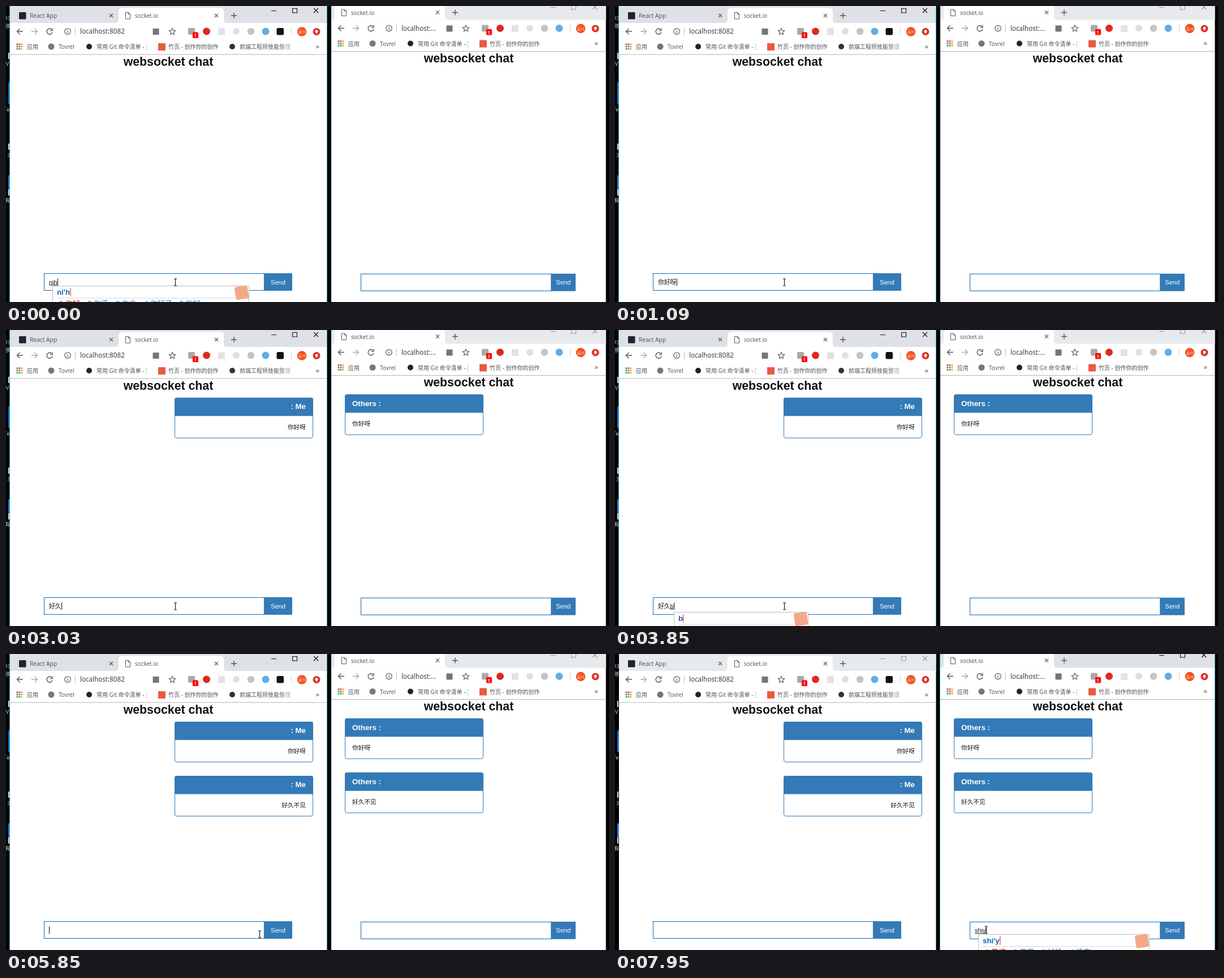
An HTML page that plays this animation: 1066x525 px, repeating every 8 s.

```html
<!DOCTYPE html>
<html lang="zh">
<head>
<meta charset="utf-8">
<title>websocket chat</title>
<style>
html, body { margin: 0; width: 100%; height: 100%; overflow: hidden; background: #000; }
svg { display: block; width: 1066px; height: 525px; }
text { white-space: pre; }
.ui { font: 10px "Open Sans", "Noto Sans CJK SC", "Noto Sans CJK", sans-serif; fill: #4b4f54; }
.url { font-size: 11.7px; fill: #333; }
.page { font: 10.7px "Liberation Sans", "Noto Sans CJK SC", "Noto Sans CJK", sans-serif; fill: #111; }
.b { font-weight: bold; }
.line { fill: none; stroke: #555; stroke-width: 1.4; }
.win { --strip: #e7eaed; --ctl: #999; --edge: none; --box: #337ab7; }
.win.on { --strip: #dee1e6; --ctl: #111; --edge: #2aa9b8; --box: #2f7dcb; }
.strip { fill: var(--strip); }
.ctl { fill: none; stroke: var(--ctl); stroke-width: 1.1; }
.edge { stroke: var(--edge); stroke-width: 1; }
.box { fill: #fff; stroke: var(--box); stroke-width: 1.2; }
.blue { fill: #337ab7; }
</style>
</head>
<body>
<svg id="stage" xmlns="http://www.w3.org/2000/svg" width="1066" height="525"></svg>
<script>
const stage = document.getElementById('stage');
const text = (x, y, s, cls = 'ui', more = '') => `<text x="${x}" y="${y}" class="${cls}" ${more}>${s}</text>`;
const rect = (x, y, w, h, more = '') => `<rect x="${x}" y="${y}" width="${w}" height="${h}" ${more}/>`;
const dot = (x, y, r, fill, more = '') => `<circle cx="${x}" cy="${y}" r="${r}" fill="${fill}" ${more}/>`;
const path = (d, cls = 'line', more = '') => `<path d="${d}" class="${cls}" ${more}/>`;
const group = (x, y, s) => `<g transform="translate(${x} ${y})">${s}</g>`;

const cross = (x, y, r, cls = 'line') =>
  path(`M${x - r} ${y - r}l${2 * r} ${2 * r}m0 ${-2 * r}l${-2 * r} ${2 * r}`, cls, cls === 'line' ? 'style="stroke-width:1.1"' : '');

function star(cx, cy, r) {
  const pts = [];
  for (let i = 0; i < 10; i++) {
    const a = i * Math.PI / 5 - Math.PI / 2, k = i % 2 ? r * .45 : r;
    pts.push((cx + k * Math.cos(a)).toFixed(1) + ',' + (cy + k * Math.sin(a)).toFixed(1));
  }
  return `<polygon points="${pts.join(' ')}" class="line" style="stroke-width:1.1"/>`;
}

const desktop = () =>
  rect(0, 0, 1066, 525) +
  [[-3, 25, '93'], [-2, 39, '移'], [0, 106, 'V'], [-3, 187, 'Te'], [2, 268, '3'], [-2, 348, '有']]
    .map(([x, y, s]) => text(x, y, s, 'ui', 'style="fill:#ddd;font-size:9px"')).join('') +
  [83, 244, 325].map(y => rect(4, y, 2, 11, 'fill="#ddd"')).join('') +
  rect(4, 135, 3, 39, 'rx="2" fill="#1976d2"') + rect(4, 300, 3, 25, 'rx="2" fill="#2f7fe0"');

function controls(x) {
  return path(`M${x} 8.5h9M${x + 37.5} 4.5h8v7.5h-8z`, 'ctl') + cross(x + 79, 8, 4, 'ctl');
}

function activeTab(x, w) {
  const r = x + w;
  return path(`M${x - 6} 30q6 0 6-6V10q0-7 7-7H${r - 7}q7 0 7 7v14q0 6 6 6z`, '', 'fill="#fff"') +
    path(`M${x + 12.5} 11.5h5l3 3v8.500h-8zM${x + 17.5} 11.500v3h3`, 'line', 'style="stroke-width:1"') +
    text(x + 29, 21, 'socket.io') + cross(r - 13, 17, 3) +
    path(`M${r + 13} 17h10m-5-5v10`);
}

const navigation = url =>
  path('M30 45H19.500m5-5-5 5 5 5') +
  path('M45 45H55.500m-5-5 5 5-5 5', 'line', 'style="stroke:#aaa"') +
  path('M80.500 41.500A5 5 0 1 0 82 46.500M82 39.500v4h-4') +
  `<circle cx="109" cy="45" r="5.300" class="line" style="stroke-width:1.1"/>` +
  path('M109 44v4M109 41.500v1.300', 'line', 'style="stroke-width:1.2"') +
  path('M122.500 38.500v13', 'line', 'style="stroke:#bbb;stroke-width:1"') +
  text(131, 49.300, url, 'ui url');

const extensions = extra =>
  rect(259.500, 40, 11, 11, 'rx="1" fill="#72767b"') + star(294, 45.500, 6) +
  rect(322, 39, 12, 12, 'rx="2" fill="#aaa"') + rect(330, 46.500, 10, 10.500, 'rx="1.5" fill="#f00"') +
  text(333.600, 55.300, '!', 'ui b', 'style="fill:#fff;font-size:9px"') +
  dot(354.500, 45, 6.500, '#e0281e') + rect(375, 39.500, 12, 12, 'fill="#e2e2e2"') +
  dot(407, 45, 6, '#e0e0e0') + dot(433, 45, 6.300, '#c4c4c4') + dot(459, 45, 6.500, '#64ace4') +
  (extra ? rect(478.500, 39, 12.500, 12.500, 'rx="2.5" fill="#111"') : '');

const menu = () =>
  path('M504.500 39v12', 'line', 'style="stroke:#ccc;stroke-width:1"') +
  dot(523, 45.500, 8.300, '#f4511e') +
  text(523, 48, '云川', 'ui', 'text-anchor="middle" style="fill:#fff;font-size:6.500px"') +
  dot(549, 45.500, 6.500, '#d93025') +
  path('M549 41.500l3.500 4h-2v3h-3v-3h-2z', '', 'fill="#fff"') +
  text(547.500, 75.500, '»', 'ui', 'style="font-size:13px"');

function bookmarks(extra) {
  const tints = ['#ea4335', '#ea4335', '#f5a623', '#34a853', '#4285f4', '#f5a623', '#34a853', '#34a853', '#f5a623'];
  return tints.map((c, i) => rect(18.500 + i % 3 * 4, 66.500 + (i / 3 | 0) * 4, 2.800, 2.800, `fill="${c}"`)).join('') +
    text(37, 76, '应用') + dot(80, 72, 5.500, '#777') + text(93, 76, 'Tovrel') +
    dot(147, 72, 5, '#222') + text(160, 76, '常用 Git 命令清单 - <tspan fill="#bbb">[</tspan>') +
    rect(269, 66, 13, 13, 'rx="1" fill="#ea5a41"') + text(287, 76, '竹页 - 创作你的创作') +
    (extra ? dot(400, 72, 5, '#333') + text(413, 76, '前端工程师技能<tspan fill="#777">整</tspan><tspan fill="#aaa">理</tspan>') : '');
}

function bubble(x, y, mine, msg) {
  const tx = mine ? x + 232 : x + 13, anchor = `text-anchor="${mine ? 'end' : 'start'}"`;
  return rect(x + .500, y + .500, 244, 71, 'rx="3.5" fill="#fff" stroke="#337ab7"') +
    path(`M${x} ${y + 32.500}v-29q0-3.500 3.500-3.500h238q3.500 0 3.500 3.500v29z`, 'blue') +
    text(tx, y + 20.300, mine ? ': Me' : 'Others :', 'page b', anchor + ' style="fill:#fff;font-size:13.3px"') +
    text(tx, y + 56, msg, 'page', anchor);
}

function chat(o) {
  return text(o.mid, o.top + 20, 'websocket chat', 'page b', 'text-anchor="middle" style="font-size:21.3px"') +
    ['你好呀', '好久不见'].map((m, i) =>
      `<g class="msg${i}">${bubble(o.bubble, o.top + 34 + i * 96, o.mine, m)}</g>`).join('') +
    rect(o.input + .500, o.field, o.send - o.input, 30, 'class="box"') +
    rect(o.send, o.field - .500, o.sendW, 31, 'class="blue" rx="1"') +
    text(o.send + o.sendW / 2, o.field + 19, 'Send', 'page', 'text-anchor="middle" style="fill:#fff;font-size:11.2px"');
}

const edges = (a, b) => path(`M${a} 0V525M${b} 0V525`, 'edge');

const leftWin = `<g class="win" id="left">` +
  rect(7, 0, 560.500, 525, 'fill="#fff"') + rect(7, 0, 560.500, 30, 'class="strip"') +
  rect(23, 11, 12.500, 12.500, 'rx="1" fill="#20232a"') + text(42, 21, 'React App', 'ui', 'style="font-size:10.3px"') + cross(186, 17, 3) +
  activeTab(199, 186) + controls(469) +
  navigation('localhost:8082') + extensions(true) + menu() + bookmarks(true) +
  rect(7, 85.500, 560.500, 1, 'fill="#b4b4b4"') +
  chat({ mid: 287, top: 86, bubble: 298, mine: true, input: 67, field: 474.500, send: 456, sendW: 50 }) +
  edges(6.500, 567.500) + `</g>`;

const rightWin = `<g class="win" id="right">` +
  rect(575, 0, 485.500, 525, 'fill="#fff"') + rect(575, 0, 485.500, 24.500, 'class="strip"') +
  group(0, -5.500, activeTab(581, 195)) + group(493, -6, controls(469)) +
  group(568, -5.500, navigation('localhost:...') + bookmarks(false)) +
  group(519, -5.500, extensions(false)) + group(493, -5.500, menu()) +
  rect(575, 80, 485.500, 1, 'fill="#b4b4b4"') +
  chat({ mid: 818, top: 80.300, bubble: 599, mine: false, input: 627, field: 475.300, send: 963.500, sendW: 43.500 })
    .replace(/114\.3/g, '114') +
  edges(574.500, 1060.500) + `</g>`;

stage.innerHTML = desktop() + leftWin + rightWin +
  `<g id="typed">${text(0, 0, '', 'page', 'id="entry" style="font-size:10.8px"')}
   <path id="under" stroke="#222" stroke-width="1"/><path id="caret" stroke="#111" stroke-width="1.1"/></g>
   <g id="popup"></g><g id="mouse"></g>`;

// time, committed text, composition, popup width, candidates
const typing = [
  [0, '', "ni'h", 348, '你好,你还,你会,你好了,拟好'],
  [150, '', "ni'ha", 340, '你好,你还,你哈,你海,拟'],
  [290, '', "ni'hao", 355, '你好,你好啊,拟好,你号,倪'],
  [420, '你好'],
  [850, '你好', 'y', 237, '有,一,也,要'],
  [970, '你好', 'ya', 237, '呀,呀,压,亚'],
  [1090, '你好呀'],
  [1490, ''],
  [2330, '', 'h', 276, '好,和,会,还,很'],
  [2470, '', 'ha', 276, '哈,哈哈,还,海'],
  [2640, '', 'hao', 276, '好,号,好好,豪'],
  [2840, '', "hao'j", 303, '好久,好几,好计,好叫'],
  [3030, '好久'],
  [3300, '好久', 'b', 238, '不,吧,被,把'],
  [3450, '好久'],
  [3730, '好久', 'b', 238, '不,吧,被,把'],
  [3870, '好久', 'bu', 238, '不,部,步,布'],
  [4010, '好久', "bu'j", 303, '不见,不仅,不久,布局'],
  [4150, '好久不见'],
  [4830, ''],
  [7530, '', 's', 276, '是,说,上,谁,三'],
  [7670, '', 'sh', 276, '是,说,上,谁,谁'],
  [7810, '', 'shi', 276, '是,时,事,十,使'],
  [7950, '', "shi'y", 303, '是呀,使用,试验,适应']
];
const moves = [
  [0, 299.500, 490, 'beam'], [5850, 448.500, 497, 'beam'], [6000, 479, 496, 'hand'],
  [6120, 530, 494, 'arrow'], [6260, 588, 492, 'arrow'], [6400, 632, 490, 'beam'],
  [6530, 650, 489, 'beam'], [6670, 656, 489, 'beam']
];
const blinks = [[1930, 2330], [4710, 4830], [5390, 5850], [6400, 6670], [7250, 7530]];
const pointers = {
  beam: path('M-2.500-6h2l.5.5.5-.5h2M0-5.500v11M-2.500 6h2l.5-.5.5.5h2', '', 'fill="none" stroke="#111" stroke-width="1.1"'),
  arrow: path('M0 0v14l3.200-3 2.300 5 2-1-2.300-4.800h4.500z', '', 'fill="#fff" stroke="#111" stroke-width=".9"'),
  hand: path('M-1 0q2-1 2 1v5q5 0 7 2v5l-2 4H0l-5-7q1-2 3 0V1z', '', 'fill="#fff" stroke="#111" stroke-width=".9"')
};
const FOCUS = 6670;
const $ = id => document.getElementById(id);
const last = (list, t) => list.filter(e => e[0] <= t).pop();
const show = (el, on) => el.setAttribute('visibility', on ? 'visible' : 'hidden');

function popupMarkup(x, y, comp, w, words) {
  const right = x + w;
  let cx = x + 12, list = '';
  words.split(',').forEach((word, i) => {
    list += text(cx, y + 36, `${i + 1}.${word}`, 'page', `style="font-size:13px;fill:${i ? '#1c86d1' : '#e02020'}"`);
    cx += 24 + word.length * 13;
  });
  return rect(x + .500, y + .500, w - 1, 60, 'fill="#fff" stroke="#bbb"') +
    text(x + 8, y + 16, comp, 'page b', 'id="pinyin" style="fill:#0a63c4;font-size:13.3px"') +
    path(`M${x + 8} ${y + 22}H${right - 26}`, '', 'stroke="#d4d4d4"') + list +
    rect(right - 25, y + 1, 23, 23, `rx="3" fill="#f3a987" transform="rotate(-8 ${right - 13} ${y + 12})"`);
}

let shown = null;

function drawTyping(step, right) {
  const [, done, comp = '', w, words] = step;
  const x0 = right ? 636 : 76, dy = right ? .700 : 0;
  const entry = $('entry');
  entry.setAttribute('x', x0);
  entry.setAttribute('y', 493.500 + dy);
  entry.textContent = done;
  const from = x0 + (done ? entry.getComputedTextLength() : 0);
  entry.textContent = done + comp.replace("'", '');
  const end = entry.textContent ? x0 + entry.getComputedTextLength() + 1 : x0 + .500;
  $('under').setAttribute('d', comp ? `M${from} ${495 + dy}H${end - 1}` : '');
  $('caret').setAttribute('d', `M${end} ${483.500 + dy}v12.500`);
  const top = (comp.length === 1 ? 500 : 496) + dy;
  $('popup').innerHTML = comp ? popupMarkup(Math.round(from + 6), top, comp, w, words) : '';
  if (comp) {
    const px = from + 15 + $('pinyin').getComputedTextLength();
    $('popup').insertAdjacentHTML('beforeend', path(`M${px} ${top + 4}v15`, '', 'stroke="#f04030" stroke-width="1.2"'));
  }
}

function frame(now) {
  const t = now % 8000, right = t >= FOCUS;
  const step = last(typing, t), key = step[0] + (right ? 'r' : 'l');
  if (key !== shown) {
    drawTyping(step, right);
    shown = key;
  }
  $('left').classList.toggle('on', !right);
  $('right').classList.toggle('on', right);
  [1490, 4830].forEach((at, i) =>
    document.querySelectorAll('.msg' + i).forEach(el => show(el, t >= at)));
  show($('caret'), !blinks.some(([a, b]) => t >= a && t < b));
  const [, mx, my, kind] = last(moves, t);
  const mouse = $('mouse');
  mouse.setAttribute('transform', `translate(${mx} ${my})`);
  if (mouse.dataset.kind !== kind) {
    mouse.dataset.kind = kind;
    mouse.innerHTML = pointers[kind];
  }
}

const start = performance.now();
function loop() {
  frame(performance.now() - start);
  requestAnimationFrame(loop);
}
loop();
</script>
</body>
</html>
```
